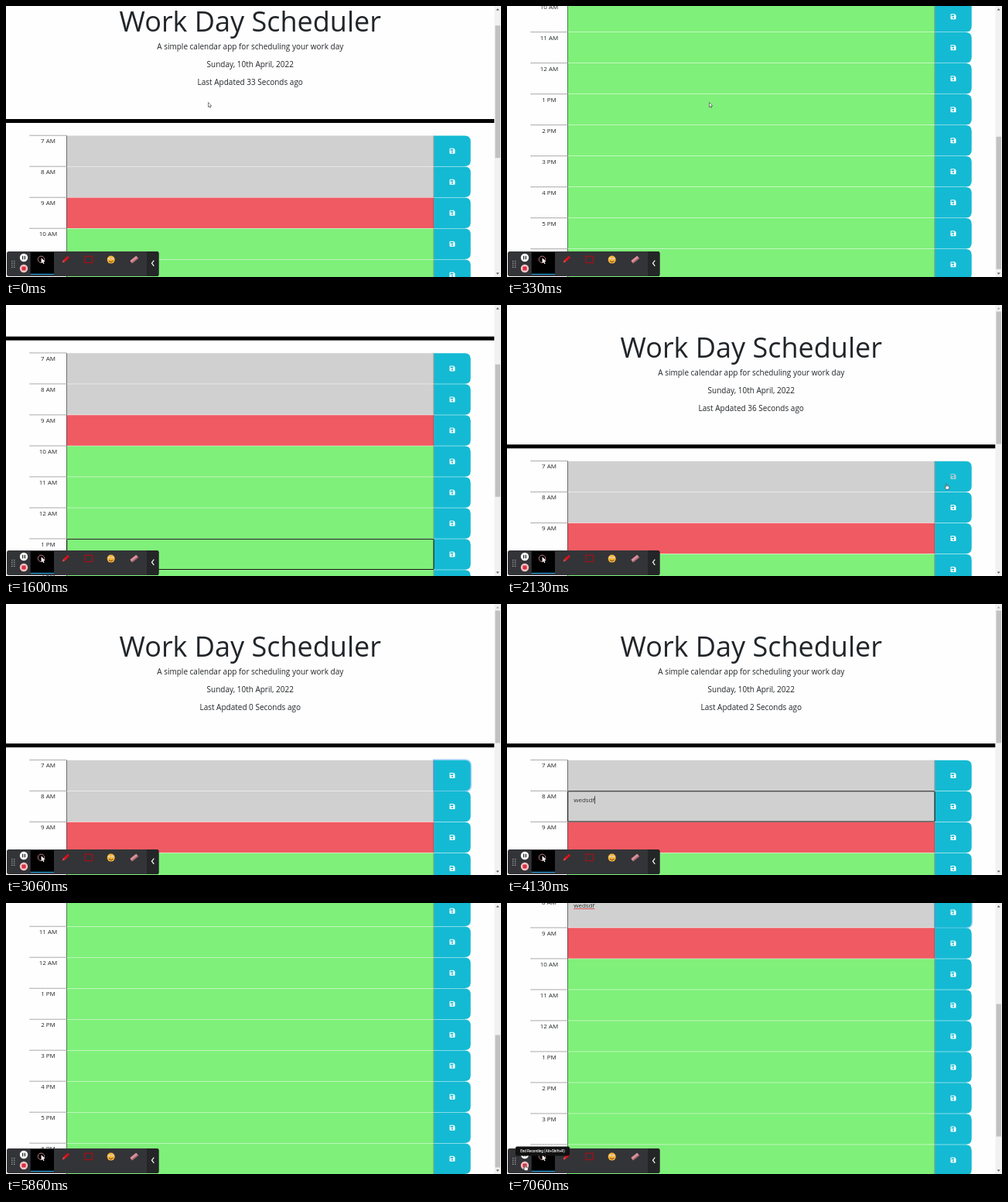
An HTML page for the animation above (7130 ms loop, 640 px wide and 350 px high).

```html
<!DOCTYPE html>
<html lang="en">
<head>
<meta charset="utf-8">
<title>Work Day Scheduler</title>
<style>
html, body { margin: 0; width: 100%; height: 100%; overflow: hidden; background: #fefefe; }
svg { display: block; }
text { font-family: "Open Sans", sans-serif; fill: #212529; white-space: pre; }
.mid { text-anchor: middle; }
#bar text, #tip text { font: 700 5.2px Roboto, sans-serif; fill: #fff; text-anchor: middle; }
#tip text { font-size: 4.6px; font-weight: 500; }
</style>
</head>
<body>
<svg width="640" height="350" viewBox="0 0 640 350">
  <defs>
    <g id="disk">
      <path d="M-3.5-2.7q0-.8.8-.8H1.7L3.5-1.7V2.7q0 .8-.8.8H-2.7q-.8 0-.8-.8Z"/>
      <path d="M-2.5-2.5H1.3V-.6H-2.5Z" fill="#14bad3"/>
      <circle cy="1.4" r="1.1" fill="#14bad3"/>
    </g>
  </defs>

  <g id="page">
    <text class="mid" x="315.75" y="67.6" font-size="36">Work Day Scheduler</text>
    <g class="mid" font-size="10">
      <text x="315.75" y="90.6">A simple calendar app for scheduling your work day</text>
      <text x="315.75" y="113.6">Sunday, 10th April, 2022</text>
      <text x="315.75" y="136.6" id="ago"></text>
    </g>
    <rect y="180.2" width="631.5" height="5"/>
    <g id="rows"></g>
    <rect id="ring" x="78.7" width="474.4" height="39.2" rx="1" fill="none" stroke="#101010"/>
    <g id="note">
      <text id="typed" x="86.2" y="255.8" font-size="8" style="fill:#333"></text>
      <rect id="wavy" x="86.2" y="256.6" height=".8" fill="#d33"/>
    </g>
    <rect id="caret" width=".7" height="10" fill="#111"/>
  </g>

  <g id="scrollbar">
    <rect x="631.5" width="8.5" height="350" fill="#f1f1f1"/>
    <rect id="thumb" x="632.5" width="6.5" height="171" fill="#c1c1c1"/>
    <path id="up" d="M633.7 5.6h4l-2-2.4Z"/>
    <path d="M633.7 344.4h4l-2 2.4Z" fill="#505050"/>
  </g>

  <g id="bar">
    <rect x="1" y="317" width="196.5" height="32" rx="2.5" fill="#333437"/>
    <path d="M182 317h13q2.5 0 2.5 2.5v27q0 2.5-2.5 2.5h-13Z" fill="#242527"/>
    <path d="M7.8 329v9M10.8 329v9" stroke="#ccc" stroke-width="1.1" stroke-dasharray="1.1 1.5"/>
    <circle cx="23" cy="325" r="5.2" fill="#fff"/>
    <path d="M21.6 322.7v4.6M24.4 322.7v4.6" stroke="#333" stroke-width="1.4"/>
    <circle cx="23" cy="339" r="5.2" fill="#f0c4c8"/>
    <rect x="20.4" y="336.4" width="5.2" height="5.2" rx="1" fill="#dc2f40"/>
    <rect x="31.7" y="318" width="30.3" height="29" fill="#000"/>
    <rect x="31.7" y="345.8" width="30.3" height="1.2" fill="#1997d8"/>
    <circle cx="45.5" cy="327.3" r="4.2" fill="none" stroke="#d98c92" stroke-width=".9"/>
    <path d="M45.6 325.3v7l1.6-1.5 1.2 2.4 1.1-.5-1.1-2.4h2.2Z" fill="#fff"/>
    <g transform="translate(77 327.5) rotate(-42)">
      <path d="M-2.4-1.6H5.2V1.6H-2.4Z" fill="#e0141e"/>
      <path d="M-2.4-1.6L-6 0-2.4 1.6Z" fill="#f04a50"/>
      <path d="M2.8-1.6V1.6" stroke="#7c0a10" stroke-width=".8"/>
    </g>
    <rect x="102" y="323.2" width="9.6" height="8.4" fill="none" stroke="#b00d14" stroke-width="1.1"/>
    <circle cx="135.7" cy="327.6" r="5" fill="#f6b73c"/>
    <path d="M132.6 326h2.4M136.6 326h2.4" stroke="#fff" stroke-width="2"/>
    <path d="M133.6 326h1M137.4 326h1M133 329.4q2.7 2.6 5.4 0" stroke="#6b3410" fill="none"/>
    <g transform="translate(165.7 327.5) rotate(-38)">
      <rect x="-5.2" y="-2.2" width="10.4" height="4.4" rx=".8" fill="#d9909c"/>
      <rect x="-5.2" y=".8" width="10.4" height="1.4" rx=".6" fill="#a9606c"/>
    </g>
    <path d="M191.3 328.6l-2.8 3.6 2.8 3.6" fill="none" stroke="#fff" stroke-width="1.2"/>
  </g>
  <g id="tip">
    <rect x="11" y="314.5" width="70" height="12" rx="2" fill="#111"/>
    <text x="46" y="322.2">End Recording (Alt+Shift+R)</text>
  </g>

  <g id="cursor" stroke="#333" stroke-width=".6" stroke-linejoin="round" fill="#fff">
    <path id="arrow" d="M0 0v6.2l1.4-1.3.9 2 .9-.4-.9-2h1.9Z"/>
    <path id="hand" d="M-.6 0q.6-.7 1.2 0v2.6l2.4.5q.9.2.8 1.2l-.5 2.8h-3.6l-2.2-2.7q.4-.9 1.9.1Z"/>
  </g>
</svg>

<script>
const $ = id => document.getElementById(id);
const LOOP = 7130, STEP = 200 / 3, TOP = 201.2, ROW = 40, MAX_SCROLL = 331.2;
const hours = [7, 8, 9, 10, 11, 12, 1, 2, 3, 4, 5, 6];
const rowY = i => TOP + i * ROW;

$('rows').innerHTML = hours.map((h, i) => {
  const y = rowY(i);
  const color = i < 2 ? '#d0d0d0' : i == 2 ? '#f05a62' : '#7ff07a';
  return `<path d="M30.75 ${y + .2}h47.5" stroke="#444" stroke-width=".9" stroke-dasharray="1 1"/>
    <text class="mid" x="54.5" y="${y + 10.1}" font-size="8">${h} ${i < 6 ? 'AM' : 'PM'}</text>
    <rect x="78.25" y="${y + .5}" width="475" height="39.5" fill="${color}"/>
    <path d="M78.5 ${y + .5}v39.5M553.2 ${y + .5}v39.5" stroke="#222" stroke-width=".6"/>
    <path id="btn${i}" d="M553.5 ${y + .5}h39.75q7.5 0 7.5 7.5v24.5q0 7.5-7.5 7.5h-39.75Z"
      fill="#14bad3" stroke="#007bff" stroke-opacity="0" stroke-width="3" paint-order="stroke"/>
    <use id="icon${i}" href="#disk" x="577" y="${y + 20.3}"/>`;
}).join('');

// Linear interpolation through [time, value...] keys
function track(keys, t) {
  const i = keys.findIndex(k => k[0] > t);
  if (i < 0) return keys.at(-1).slice(1);
  if (!i) return keys[0].slice(1);
  const a = keys[i - 1], b = keys[i], f = (t - a[0]) / (b[0] - a[0]);
  return a.slice(1).map((v, j) => v + (b[j + 1] - v) * f);
}

const scrollKeys = [[0, 34.2], [333, 327.7], [400, MAX_SCROLL], [1330, MAX_SCROLL], [1600, 139.5],
  [1800, 0], [5200, 0], [5333, 100], [5640, MAX_SCROLL], [6130, MAX_SCROLL], [6400, 249.5]];
const mouseKeys = [[0, 261.5, 124.5], [1900, 261.5, 124.5], [2060, 568, 231], [2800, 568, 231],
  [3130, 300, 260], [4330, 300, 260], [4530, 568, 266], [4930, 568, 266], [5130, 400, 240],
  [6530, 400, 240], [6930, 23.5, 338.5]];

const SAVE1 = 2470, EDIT = 3270, SAVE2 = 4670;
const word = 'wedsdf';
const between = (t, a, b) => t >= a && t < b;
const show = (id, on) => $(id).style.display = on ? '' : 'none';
const set = (id, name, value) => $(id).setAttribute(name, value);
const ticks = t => Math.floor((t + 900) / 1000);

function draw(t) {
  const [scroll] = track(scrollKeys, t);
  set('page', 'transform', `translate(0 ${-scroll})`);
  set('thumb', 'y', 8.5 + scroll / MAX_SCROLL * 162);
  set('up', 'fill', scroll ? '#505050' : '#a3a3a3');

  const seconds = t < SAVE1 ? 33 + ticks(t) : ticks(t) - ticks(t < SAVE2 ? SAVE1 : SAVE2);
  $('ago').textContent = `Last Apdated ${seconds} Seconds ago`;

  // Focused field, typed note and caret
  const onePm = between(t, 900, SAVE1), eight = between(t, EDIT, SAVE2);
  const y = rowY(onePm ? 6 : 1);
  show('ring', onePm || eight);
  set('ring', 'y', y + .6);
  const count = Math.max(0, Math.min(word.length, Math.floor((t - 3400) / 100)));
  $('typed').textContent = word.slice(0, count);
  const width = count ? $('typed').getComputedTextLength() : 0;
  set('wavy', 'width', width);
  show('wavy', t >= SAVE2);
  const typing = between(t, 3400, 4300);
  show('caret', (onePm || eight) && (typing || (t - (onePm ? 900 : EDIT)) % 1060 < 530));
  set('caret', 'x', 86.2 + width);
  set('caret', 'y', y + 6.8);

  // Save buttons: hovered icon and focus glow
  const hover = [between(t, 2060, 2830), between(t, 4530, 4960)];
  const focus = [between(t, SAVE1, EDIT), t >= SAVE2];
  for (let i = 0; i < hours.length; i++) {
    set('icon' + i, 'fill', hover[i] ? '#a8cdd3' : '#fff');
    set('btn' + i, 'stroke-opacity', focus[i] ? .3 : 0);
  }

  const [mx, my] = track(mouseKeys, t);
  const arrow = t < 800, hand = hover[0] || hover[1] || t >= 6900;
  set('cursor', 'transform', `translate(${mx} ${my})`);
  show('arrow', arrow);
  show('hand', hand);
  show('tip', t >= 6980);
}

const start = performance.now();
function tick() {
  const t = (performance.now() - start) % LOOP;
  draw(Math.floor((t + 6.7) / STEP) * STEP);
  requestAnimationFrame(tick);
}
tick();
</script>
</body>
</html>
```
